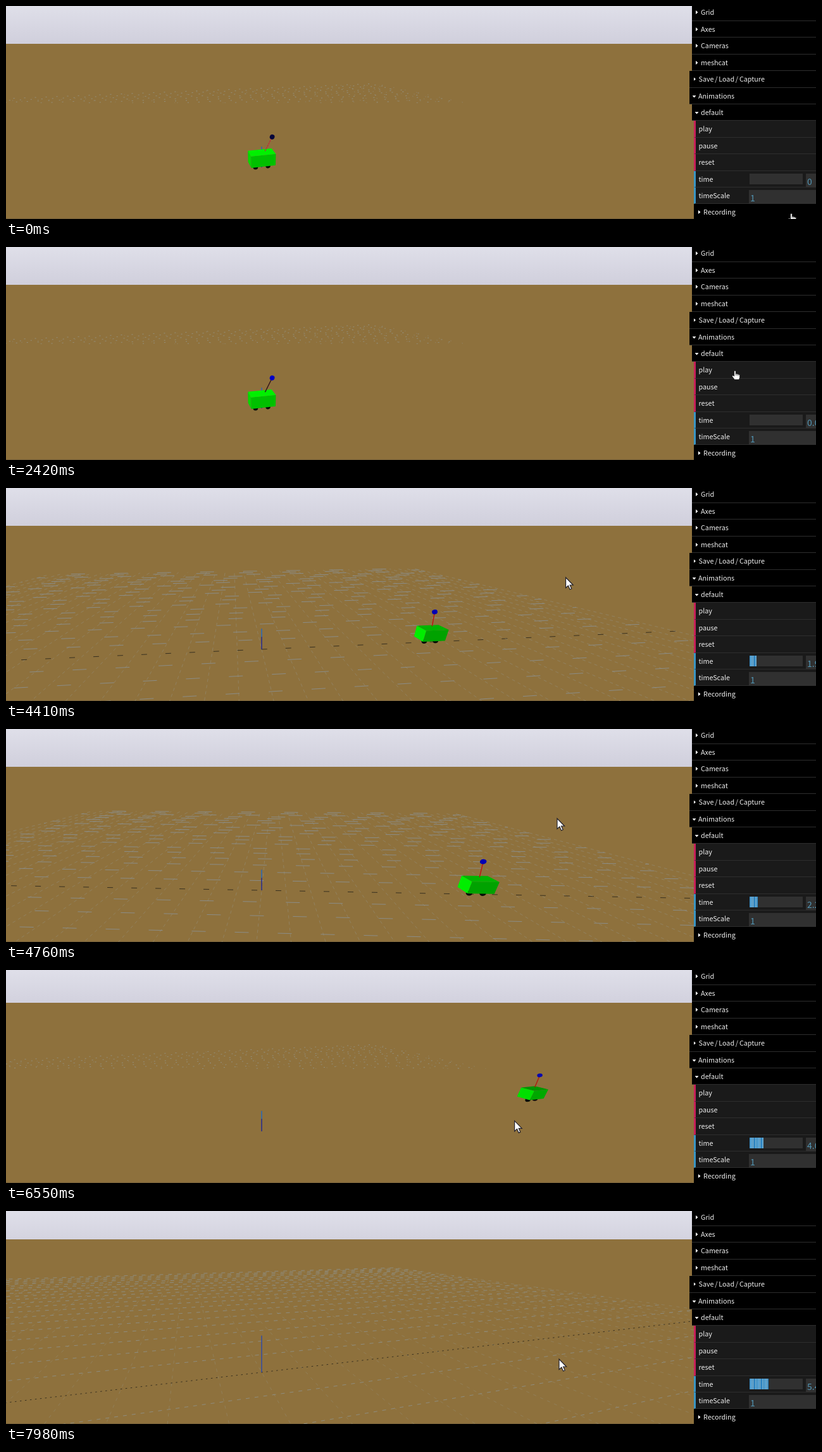
Recreate the animation shown at these times as an HTML page with a canvas. Size 1280x338 px, loop 8 s.

```html
<!DOCTYPE html>
<html lang="en">
<head>
<meta charset="utf-8">
<title>Cart and pole viewer</title>
<style>
html, body { margin: 0; width: 100%; height: 100%; overflow: hidden; background: #8e713d; }
#stage { position: relative; width: 1280px; height: 338px; overflow: hidden;
  font: 10.75px/26px "Noto Sans CJK JP", "Noto Sans CJK SC", "Noto Sans CJK", "Noto Sans", sans-serif; color: #eee; }
#stage > * { position: absolute; }
canvas, #stage > svg { left: 0; top: 0; }
.row { right: 0; box-sizing: border-box; background: #000;
  border-bottom: 1px solid #2e2e2e; white-space: pre; word-spacing: -.6px; }
.row span { position: absolute; top: 0; }
.row i { position: absolute; top: 10px; width: 3.5px; height: 6px; background: #fff;
  clip-path: polygon(0 0, 100% 50%, 0 100%); }
.row i.open { top: 12px; width: 6px; height: 3.5px; clip-path: polygon(0 0, 100% 0, 50% 100%); }
.control { background: #1a1a1a; border-left: 3px solid #c8205a; }
.number { border-left-color: #3a96c4; }
.field { background: #303030; overflow: hidden; color: #5295b4; font-size: 14px; line-height: 24px; white-space: pre; }
#bar { height: 100%; background: repeating-linear-gradient(90deg,
  #3c8fc6 0 2px, #79b4d8 2px 3px, #4797cc 3px 5px, #92b5c4 5px 6px, #3186c2 6px 9px, #64a5cc 9px 11px); }
</style>
</head>
<body>
<div id="stage">
  <canvas id="view" width="1280" height="338"></canvas>
  <svg id="pointer" width="1280" height="338">
    <path id="arrow" d="M0 0V16.5L3.9 13L6.6 19L9.2 17.8L6.6 12H11.6Z" fill="#fff" stroke="#22202a" stroke-width="1.2"/>
    <g id="hand" fill="#fff" stroke="#111" stroke-width="0.8">
      <path d="M-1.3 1Q0-.8 1.3 1V5.2Q2.8 4.5 3.5 5.7Q5 5 5.7 6.3Q7.5 6 7.7 7.6V11L6.4 14.5H-.5L-4.4 9.5Q-4.7 7.4-3 7.8L-1.3 9Z"/>
      <path d="M1.3 5V8M3.5 5.8V8.3M5.7 6.4V8.6" fill="none" stroke-width="0.6"/>
    </g>
  </svg>
</div>
<script>
const LOOP = 8000, START = 2420, STEP = 68.6;
const FOCAL = 408, CX = 404, CY = 256;
const stage = document.getElementById('stage');
const pointer = document.getElementById('pointer');
const arrow = document.getElementById('arrow');
const hand = document.getElementById('hand');
const ctx = document.getElementById('view').getContext('2d');

// Each track is a list of [time, value...]
const tracks = {
  azimuth: [[4200, 14.5], [4620, -3], [4760, -2.4], [4830, 2], [5040, 14.5]],
  horizon: [[4770, 59], [4830, 51], [6540, 51], [6950, 46], [7350, 46], [7800, 44]],
  distance: [[6540, 5.3], [6950, 3.75], [7350, 3.75], [7800, 3]],
  travel: [[2420, 0], [3580, 2.25], [4760, 4.24], [5520, 5.72], [7090, 8.38], [7980, 9.95]],
  lean: [[2420, .46], [2750, .3], [3100, .06], [3580, -.04], [4300, -.12], [4760, -.14], [5520, -.05], [6300, -.09], [7090, -.11]],
  cursor: [[0, 1241, 329], [70, 1238, 326], [400, 1195, 262], [820, 1151, 196], [2480, 1152, 196],
    [2800, 1060, 192], [3200, 910, 190], [3580, 886, 188], [3850, 897, 148], [4200, 899, 142],
    [4620, 870, 142], [4760, 871, 142], [4830, 878, 142], [5040, 895, 142], [5720, 895, 142],
    [6400, 805, 238], [6600, 803, 240], [7290, 803, 240], [7850, 874, 235]]
};

function at(keys, t) {
  if (t <= keys[0][0]) return keys[0].slice(1);
  for (let i = 1; i < keys.length; i++) {
    const a = keys[i - 1], b = keys[i];
    if (t <= b[0]) {
      const k = (t - a[0]) / (b[0] - a[0]);
      return a.slice(1).map((v, j) => v + (b[j + 1] - v) * k);
    }
  }
  return keys[keys.length - 1].slice(1);
}
const noise = n => { const v = Math.sin(n * 12.9898) * 43758.5453; return v - Math.floor(v); };

function add(parent, cls, style, text = '') {
  const el = document.createElement('div');
  el.className = cls;
  Object.assign(el.style, style);
  el.textContent = text;
  parent.insertBefore(el, parent === stage ? pointer : null);
  return el;
}
const px = v => v + 'px';

// label, left edge, text x, kind
const rows = [
  ['Grid', 1084, 1098, 'shut'], ['Axes', 1084, 1098, 'shut'], ['Cameras', 1084, 1098, 'shut'],
  ['meshcat', 1084, 1098, 'shut'], ['Save / Load / Capture', 1080, 1094.5, 'shut'],
  ['Animations', 1080, 1094, 'open'], ['default', 1084, 1098, 'open'],
  ['play', 1087, 1094.5, 'control'], ['pause', 1087, 1094.5, 'control'], ['reset', 1087, 1094.5, 'control'],
  ['time', 1087, 1094.5, 'control number'], ['timeScale', 1087, 1094.5, 'control number'],
  ['Recording', 1087, 1102, 'shut']
];
const rowTop = i => Math.round(-2.6 + i * 26.42);
rows.forEach(([label, left, x, kind], i) => {
  const row = add(stage, 'row ' + kind,
    { left: px(left), top: px(rowTop(i)), height: px(rowTop(i + 1) - rowTop(i)) });
  const folder = !kind.startsWith('control');
  const text = document.createElement('span');
  text.textContent = label;
  text.style.left = px(x - left - (folder ? 0 : 3));
  row.append(text);
  if (folder) {
    const mark = document.createElement('i');
    mark.className = kind;
    mark.style.left = px(x - left - (kind === 'open' ? 9.5 : 8));
    row.append(mark);
  }
});
const box = (x, y, w, h, text) =>
  add(stage, 'field', { left: px(x), top: px(y), width: px(w), height: px(h), textIndent: '2px' }, text);
const slider = box(1175, 265.5, 84, 17.5);
const bar = add(slider, '', {});
bar.id = 'bar';
const clock = box(1264, 266, 60, 21, '0');
box(1174, 292, 106, 22, '1');

function camera(t) {
  const a = at(tracks.azimuth, t)[0] * Math.PI / 180;
  const horizon = at(tracks.horizon, t)[0], dist = at(tracks.distance, t)[0];
  const e = Math.atan2(CY - horizon, FOCAL);
  const ca = Math.cos(a), sa = Math.sin(a), ce = Math.cos(e), se = Math.sin(e);
  const depth = (p, q, z) => dist + (p * sa + q * ca) * ce - z * se;
  const project = (p, q, z) => {
    const k = FOCAL / depth(p, q, z);
    return [CX + (p * ca - q * sa) * k, CY - ((p * sa + q * ca) * se + z * ce) * k, k];
  };
  return { horizon, depth, project };
}

function stroke(points, color, width, dash = [], offset = 0) {
  ctx.strokeStyle = color;
  ctx.lineWidth = width;
  ctx.setLineDash(dash);
  ctx.lineDashOffset = offset;
  ctx.beginPath();
  points.forEach(([x, y]) => ctx.lineTo(x, y));
  ctx.stroke();
}

function fill(points, color) {
  ctx.fillStyle = color;
  ctx.beginPath();
  points.forEach(([x, y]) => ctx.lineTo(x, y));
  ctx.fill();
}

// Ground line between two floor points, cut in front of the camera
function floorLine(cam, a, b) {
  const near = .4, da = cam.depth(...a, 0), db = cam.depth(...b, 0);
  if (da < near && db < near) return null;
  const cut = k => a.map((v, i) => v + (b[i] - v) * k);
  const k = (near - da) / (db - da);
  if (da < near) a = cut(k);
  else if (db < near) b = cut(k);
  return [cam.project(...a, 0), cam.project(...b, 0)];
}

const gridStyles = {
  far: { row: [2, 15], col: [1.5, 17], rowColor: 'rgba(150,152,142,.75)', colColor: 'rgba(150,152,142,.55)', axis: null },
  side: { row: [22, 46], col: [5, 5], rowColor: 'rgba(139,148,154,.8)', colColor: 'rgba(150,148,134,.6)', axis: [9, 29] },
  close: { row: [6, 8], col: [5, 7], rowColor: 'rgba(143,150,148,.75)', colColor: 'rgba(150,146,124,.55)', axis: [2.5, 5.5] }
};

function drawGrid(cam, t) {
  const mode = t > 4260 && t < 5010 ? 'side' : t > 6540 ? 'close' : 'far';
  const s = gridStyles[mode];
  ctx.save();
  if (mode === 'far') {
    ctx.beginPath();
    ctx.rect(0, 0, 1083, cam.horizon + (t < 4500 ? 95 : 106));
    ctx.clip();
  }
  for (let i = -20; i <= 20; i++) {
    const v = i / 2;
    const col = floorLine(cam, [v, 10], [v, -10]);
    if (col) stroke(col, s.colColor, .8, s.col, noise(i + 90) * 40);
    const row = floorLine(cam, [10, v], [-10, v]);
    if (!row) continue;
    if (i === 0 && s.axis) stroke(row, '#38301f', 1, s.axis);
    else stroke(row, s.rowColor, 1, s.row, noise(i + 30) * 80);
  }
  ctx.restore();
}

function ball(cam, p, q, z, r, color) {
  const [x, y, k] = cam.project(p, q, z);
  const dx = x - CX, dy = y - CY;
  ctx.fillStyle = color;
  ctx.beginPath();
  ctx.ellipse(x, y, r * k * Math.hypot(1, Math.hypot(dx, dy) / FOCAL), r * k, Math.atan2(dy, dx), 0, 7);
  ctx.fill();
}

// time, end, top, front, ball, pole
const paints = [
  [0, '#00d800', '#00f000', '#00c000', '#06063a', '#c02a3a'],
  [2420, '#00d800', '#00f000', '#00c000', '#0000c4', '#30101a'],
  [3180, '#00e400', '#00e000', '#00b000', '#080840', '#c81414'],
  [4050, '#00ee00', '#00b400', '#00a200', '#0000b4', '#c01010'],
  [5060, '#00e000', '#009600', '#00a800', '#0808b0', '#b01c10'],
  [6540, '#00b200', '#009200', '#009c00', '#04044c', '#c03020']
];

function drawCart(cam, t) {
  const [, end, top, front, tip, rod] = paints.filter(p => p[0] <= t + 1).pop();
  const s = at(tracks.travel, t)[0], L = .25, W = .15, lo = .085, hi = .335;
  const pt = (p, q, z) => cam.project(s + p * L, q * W, z);
  for (const p of [-.14, .12]) ball(cam, s + p, -.05, .045, .05, t > 6540 ? '#05053e' : '#080c08');
  fill([pt(-1, -1, lo), pt(-1, 1, lo), pt(-1, 1, hi), pt(-1, -1, hi)], end);
  fill([pt(-1, -1, lo), pt(1, -1, lo), pt(1, -1, hi), pt(-1, -1, hi)], front);
  fill([pt(-1, -1, hi), pt(1, -1, hi), pt(1, 1, hi), pt(-1, 1, hi)], top);
  const lean = at(tracks.lean, t)[0];
  const along = r => [s + r * Math.sin(lean), 0, .21 + r * Math.cos(lean)];
  stroke([cam.project(...along(.16)), cam.project(...along(.48))], rod, 1.4, t < START - 1 ? [3, 1] : []);
  ball(cam, ...along(.48), .048, tip);
}

function drawScene(t) {
  const cam = camera(t);
  ctx.fillStyle = '#8e713d';
  ctx.fillRect(0, 0, 1280, 338);
  const sky = ctx.createLinearGradient(0, 0, 0, 60);
  sky.addColorStop(0, '#dfdfe9');
  sky.addColorStop(1, '#d0cfdc');
  ctx.fillStyle = sky;
  ctx.fillRect(0, 0, 1280, Math.round(cam.horizon) + 1);
  ctx.fillStyle = '#756039';
  ctx.fillRect(0, 337, 1087, 1);
  drawGrid(cam, t);
  const axis = z => cam.project(0, 0, z);
  const teal = t > 6540 && t < 7350;
  stroke([axis(0), axis(.45)], teal ? '#12303c' : t > 7350 ? '#2446b4' : '#14209c', 1.3);
  if (t < 6540) stroke([axis(.28), axis(.45)], '#4384ac', 1.3);
  drawCart(cam, t);
}

function draw(now) {
  const real = now % LOOP;
  const t = Math.max(0, START + Math.floor((real - START) / STEP + .15) * STEP);
  const time = Math.max(0, (t - START) / 1000 * .975);
  drawScene(t);
  clock.textContent = t < START - 1 ? '0' : (time + .01).toFixed(2);
  bar.style.width = px(time * 5.55);
  const [x, y] = at(tracks.cursor, t);
  const onPanel = x > 1083;
  hand.style.display = onPanel ? '' : 'none';
  arrow.style.display = onPanel ? 'none' : '';
  (onPanel ? hand : arrow).setAttribute('transform', `translate(${x} ${y})`);
}

const begin = performance.now();
function loop() {
  draw(performance.now() - begin);
  requestAnimationFrame(loop);
}
loop();
</script>
</body>
</html>
```
